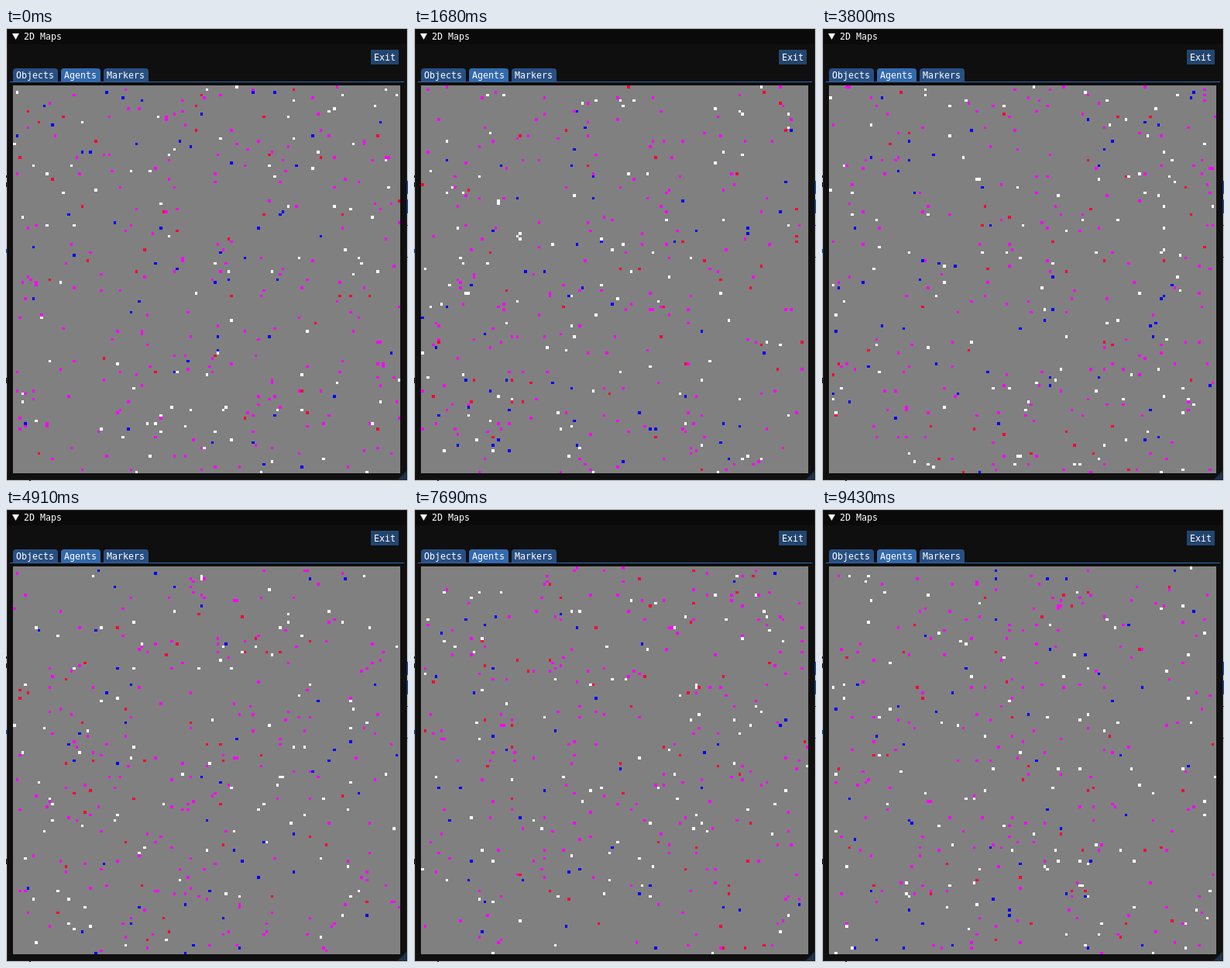
These frames come from a looping animation (519x584 px, 9460 ms). An HTML page with a canvas:

```html
<!DOCTYPE html>
<html lang="en">
<head>
<meta charset="utf-8">
<title>2D Maps</title>
<style>
  html, body { margin: 0; width: 519px; height: 584px; overflow: hidden; background: #dcdcdc; }
  svg, canvas { position: absolute; display: block; }
  svg { left: 0; top: 0; }
  canvas { left: 9px; top: 74px; }
  text { font: 11.63px "DejaVu Sans Mono", monospace; fill: #fff; white-space: pre; }
</style>
</head>
<body>
<svg width="519" height="584">
  <!-- slivers of the page behind the window -->
  <path d="M517 197h2v17h-2zM517 221h2v18h-2z" fill="#1059d0"/>
  <path d="M518 254h1v1h-1zM518 295h1v1h-1zM0 285h1v5h-1z" fill="#1059d0"/>
  <path d="M0 190h1v3h-1zM0 199h1v6h-1zM0 451h1v7h-1zM30 583h2v1h-2z" fill="#222"/>
  <!-- window -->
  <rect x="1" y="1" width="517" height="582" fill="#0f0f0f"/>
  <rect x="1" y="1" width="517" height="20" fill="#0a0a0a"/>
  <path d="M517 571V582H506z" fill="#1c314a"/>
  <rect x="1.5" y="1.5" width="516" height="581" fill="none" stroke="#3e3e47" stroke-opacity=".6"/>
  <path d="M8 7H17L12.5 15z" fill="#fff"/>
  <text x="23" y="15">2D Maps</text>
  <rect x="471" y="28" width="36" height="19" fill="#23456d"/>
  <text x="475" y="42">Exit</text>
  <!-- tabs -->
  <path d="M9 69V56q0-4 4-4h50q4 0 4 4V69zM126 69V56q0-4 4-4h50q4 0 4 4V69z" fill="#294f82"/>
  <path d="M71 69V56q0-4 4-4h43q4 0 4 4V69z" fill="#3369ad"/>
  <rect x="5" y="69" width="509" height="1" fill="#3369ad"/>
  <text x="13" y="65">Objects</text>
  <text x="75" y="65">Agents</text>
  <text x="130" y="65">Markers</text>
</svg>
<canvas id="map" width="500" height="500"></canvas>
<script>
const LOOP = 9460, STEP = 30, GRID = 143, CELL = 3.5, AGENTS = 390;
// Each colour with its share of the agents.
const KINDS = [['#f0f', 0.52], ['#ff0033', 0.11], ['#00f', 0.13], ['#fff', 0.24]];
const ctx = document.getElementById('map').getContext('2d');

function generator(seed) {
  return () => {
    seed = (seed + 0x6D2B79F5) | 0;
    let r = Math.imul(seed ^ seed >>> 15, 1 | seed);
    r = r + Math.imul(r ^ r >>> 7, 61 | r) ^ r;
    return ((r ^ r >>> 14) >>> 0) / 4294967296;
  };
}

const edge = i => Math.round(i * CELL);

function pickColor(share) {
  return KINDS.find(([, part]) => (share -= part) < 0)?.[0] ?? '#fff';
}

// The agents are scattered afresh on the grid at every step.
function draw(step) {
  const random = generator(Math.imul(step + 1, 0x9E3779B1));
  const cell = () => Math.floor(random() * GRID);
  ctx.fillStyle = '#808080';
  ctx.fillRect(0, 0, 500, 500);
  for (let i = 0; i < AGENTS; i++) {
    const x = cell(), y = cell();
    ctx.fillStyle = pickColor(random());
    ctx.fillRect(edge(x), edge(y), edge(x + 1) - edge(x), edge(y + 1) - edge(y));
  }
}

const start = performance.now();
function frame() {
  draw(Math.floor((performance.now() - start) % LOOP / STEP));
  requestAnimationFrame(frame);
}
frame();
</script>
</body>
</html>
```
